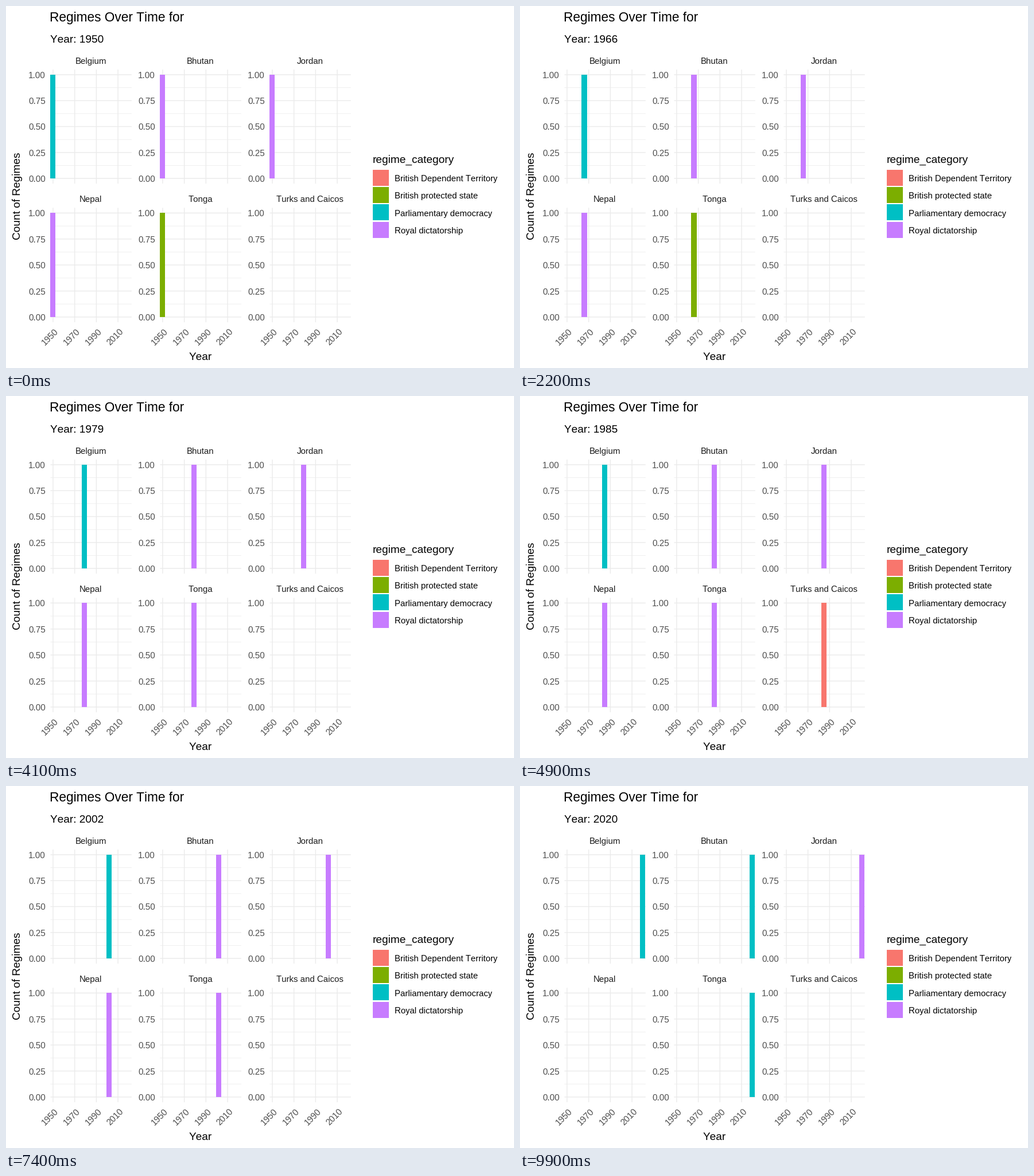
These frames come from a looping animation (885x632 px, 10 s). A matplotlib script:

```python
import math

import matplotlib.pyplot as plt
from matplotlib.animation import FuncAnimation
from matplotlib.patches import Rectangle

plt.rcParams.update({
    "font.family": "Liberation Sans",
    "text.kerning_factor": 6,
    "text.hinting": "native",
})

W, H, DPI = 885, 632, 64
PT = 72 / DPI            # points per pixel
FRAMES, INTERVAL = 100, 100
START, END = 1950, 2020

LEFT, COL_STEP = 77.45, 190.98
YEAR_W, BAR_YEARS = 1.885, 5
PANEL_W = (END - START + BAR_YEARS) * YEAR_W
ROWS = [(120, 301), (361.4, 543)]    # y of count 1 and count 0

TERRITORY, PROTECTED = "British Dependent Territory", "British protected state"
PARLIAMENT, ROYAL = "Parliamentary democracy", "Royal dictatorship"
COLORS = {
    TERRITORY: "#F8766D",
    PROTECTED: "#7CAE00",
    PARLIAMENT: "#00BFC4",
    ROYAL: "#C77CFF",
}

# First year of each regime; None means no bar.
HISTORY = {
    "Belgium": [(1950, PARLIAMENT)],
    "Bhutan": [(1950, ROYAL), (2008, PARLIAMENT)],
    "Jordan": [(1950, ROYAL)],
    "Nepal": [(1950, ROYAL), (1991, PARLIAMENT), (2002, ROYAL), (2008, None)],
    "Tonga": [(1950, PROTECTED), (1970, ROYAL), (2010, PARLIAMENT)],
    "Turks and Caicos": [(1950, None), (1983, TERRITORY), (2002, None)],
}

fig = plt.figure(figsize=(W / DPI, H / DPI), dpi=DPI, facecolor="white")
ax = fig.add_axes([0, 0, 1, 1])
ax.set(xlim=(0, W), ylim=(H, 0))
ax.axis("off")


def label(x, y, text, size, color="black", ha="left", angle=0):
    return ax.text(x, y, text, fontsize=size * PT, color=color, ha=ha,
                   va="baseline", rotation=angle, rotation_mode="anchor")


def grid(draw, at, lo, hi, width):
    draw(at, lo, hi, color="#EBEBEB", lw=width * PT, snap=False, zorder=1)


def draw_panel(name, row, col):
    x0 = LEFT + col * COL_STEP
    x1 = x0 + PANEL_W
    top, base = ROWS[row]
    height = base - top
    pad = 0.05 * height

    grid(ax.hlines, [base - height * k / 8 for k in (1, 3, 5, 7)], x0, x1, 0.75)
    grid(ax.hlines, [base - height * k / 4 for k in range(5)], x0, x1, 1.4)
    ticks = {y: x0 + (y - START + BAR_YEARS / 2) * YEAR_W - 0.2
             for y in range(START, END, 20)}
    grid(ax.vlines, list(ticks.values()), top - pad, base + pad, 1.4)

    label(x0 + PANEL_W / 2 - 0.5, top - 19, name, 15, "#1A1A1A", "center")
    for k in range(5):
        label(x0 - 8.4, base - height * k / 4 + 6, f"{k / 4:.2f}", 15.4,
              "#4D4D4D", "right")
    if row == 1:
        for year, x in ticks.items():
            label(x - 1.8, 581.4, str(year), 15.4, "#4D4D4D", "center", 45)

    bar = Rectangle((0, round(top)), 0, base - round(top), lw=0, zorder=2,
                    antialiased=False)
    return ax.add_patch(bar)


def draw_legend():
    label(638.5, 274, "regime_category", 19)
    for k, (name, color) in enumerate(COLORS.items()):
        y = 285.9 + 30.25 * k
        ax.add_patch(Rectangle((639.2, y), 28, 28, color=color, lw=0))
        label(677, round(y + 20.2), name, 15)


def regime(name, year):
    return [kind for since, kind in HISTORY[name] if since <= year][-1]


label(76.5, 27, "Regimes Over Time for", 22.6)
subtitle = label(77, 64, "", 19)
label(338.5, 618, "Year", 19, ha="center")
label(25, 332, "Count of Regimes", 19, ha="center", angle=90)
draw_legend()
bars = {name: draw_panel(name, *divmod(k, 3)) for k, name in enumerate(HISTORY)}


def update(i):
    year = START + round(i * (END - START) / (FRAMES - 1))
    subtitle.set_text(f"Year: {year}")
    for k, (name, bar) in enumerate(bars.items()):
        kind = regime(name, year)
        bar.set_visible(kind is not None)
        if kind:
            x = LEFT + k % 3 * COL_STEP + (year - START) * YEAR_W
            left, right = math.floor(x), math.floor(x + BAR_YEARS * YEAR_W)
            bar.set(x=left, width=right - left, facecolor=COLORS[kind])
    return [subtitle, *bars.values()]


anim = FuncAnimation(fig, update, frames=FRAMES, interval=INTERVAL,
                     repeat=True, repeat_delay=0, blit=False)
plt.show()
```
